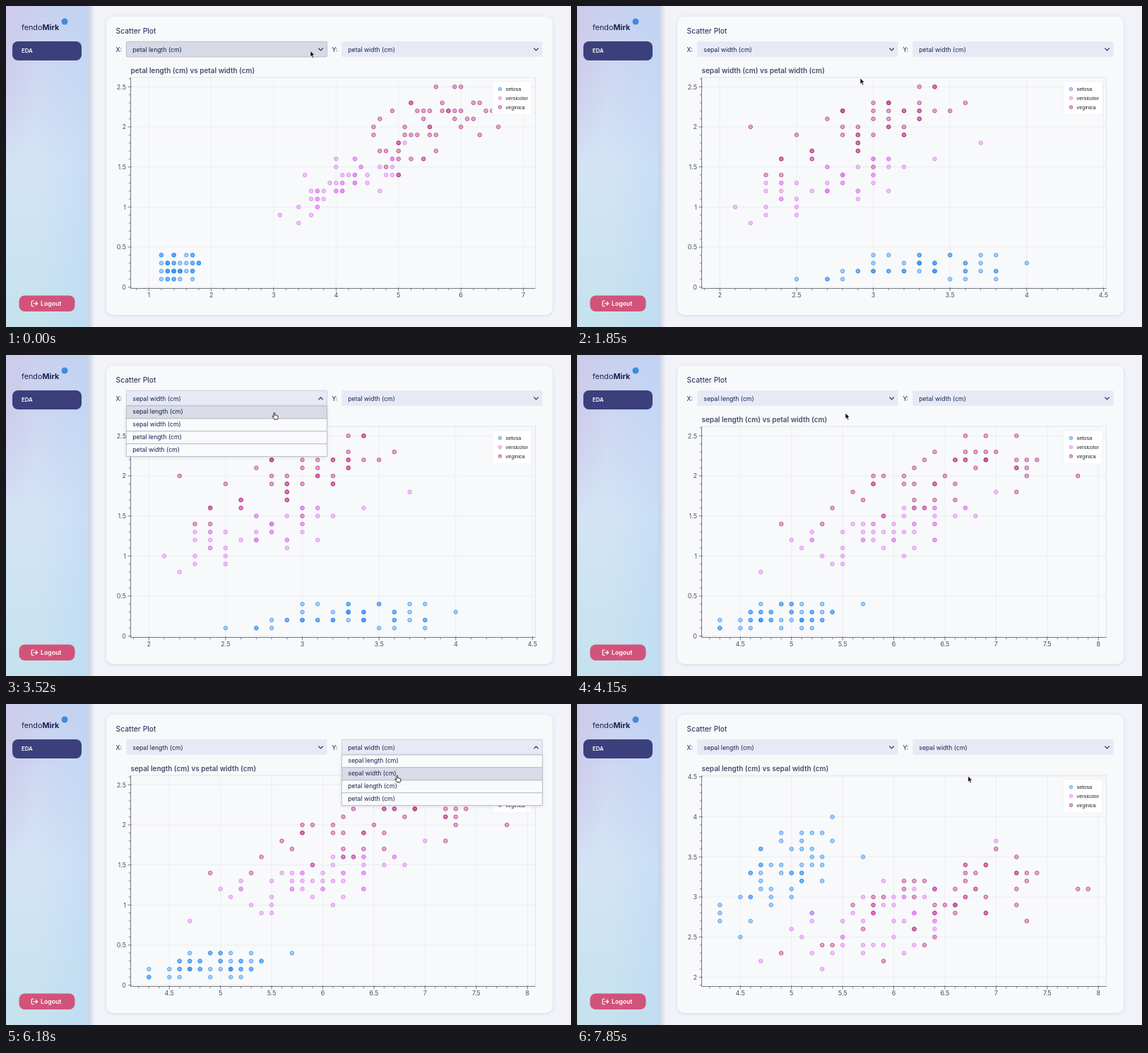
An HTML page that plays this animation: 800 px wide and 454 px high, repeating every 7.88 s.

```html
<!DOCTYPE html>
<html lang="en">
<head>
<meta charset="utf-8">
<title>Scatter Plot</title>
<style>
  html, body { margin: 0; width: 100%; height: 100%; overflow: hidden; background: #f1f3f9; }
  svg { display: block; width: 800px; height: 454px; font: 8.7px Inter, sans-serif; fill: #1c2050; }
  .legend { font: 7.4px "Liberation Sans", Arial, sans-serif; fill: #222; }
  .ticks { font-size: 9px; fill: #4c4f66; }
  .line { fill: none; stroke: #2c3058; stroke-width: 1.2; stroke-linecap: round; stroke-linejoin: round; }
</style>
</head>
<body>
<svg viewBox="0 0 800 454">
  <defs>
    <linearGradient id="side" x1="0" y1="0" x2="0" y2="1">
      <stop offset="0" stop-color="#c9d0ee"/>
      <stop offset=".5" stop-color="#d4e4f5"/>
      <stop offset="1" stop-color="#c5e2ed"/>
    </linearGradient>
    <linearGradient id="sheen">
      <stop offset=".4" stop-color="#b8d6f8" stop-opacity="0"/>
      <stop offset="1" stop-color="#b8d6f8" stop-opacity=".45"/>
    </linearGradient>
    <radialGradient id="lilac" cx="0" cy=".12" r=".4">
      <stop offset="0" stop-color="#d0c6e8" stop-opacity=".7"/>
      <stop offset="1" stop-color="#d0c6e8" stop-opacity="0"/>
    </radialGradient>
    <linearGradient id="shade">
      <stop offset="0" stop-color="#8f9cc0" stop-opacity=".4"/>
      <stop offset="1" stop-color="#8f9cc0" stop-opacity="0"/>
    </linearGradient>
    <filter id="soft" x="-10%" y="-10%" width="120%" height="125%">
      <feDropShadow dx="0" dy="1" stdDeviation="2" flood-color="#5a6490" flood-opacity=".2"/>
    </filter>
  </defs>

  <rect width="800" height="454" fill="#f1f3f9"/>
  <rect x="116" width="10" height="454" fill="url(#shade)"/>
  <rect width="116" height="454" fill="url(#side)"/>
  <rect width="116" height="454" fill="url(#lilac)"/>
  <rect width="116" height="454" fill="url(#sheen)"/>
  <circle cx="83" cy="22" r="4.5" fill="#3f8be0"/>
  <text x="22" y="34.3" font-size="10.8">fendo<tspan font-weight="700">Mirk</tspan></text>
  <rect x="9" y="50" width="98" height="27" rx="8" fill="#3b407c"/>
  <rect x="18.5" y="409.5" width="79" height="22.5" rx="8" fill="#d2537a"/>
  <rect x="142" y="15" width="632" height="422" rx="10" fill="#f8f9fb" filter="url(#soft)"/>
  <g fill="#fff" font-weight="600">
    <text x="22" y="66.3" font-size="7.8">EDA</text>
    <text x="49" y="424">Logout</text>
  </g>
  <path class="line" style="stroke:#fff" d="M39 417h-1.5q-1.3 0-1.3 1.3v5q0 1.3 1.3 1.3h1.5M39.3 420.8h5.2M42.3 418.4l2.4 2.4-2.4 2.4"/>
  <text x="155.5" y="38.8" font-size="10.4">Scatter Plot</text>
  <text x="155.5" y="64.6">X:</text>
  <text x="461.5" y="64.6">Y:</text>
  <g id="chart"></g>
  <g id="controls"></g>
  <path id="arrow" d="M0 0v8.4l1.9-1.7 1.4 3.2 1.5-.7-1.4-3.1h2.6z" fill="#000" stroke="#fff" stroke-width=".7"/>
  <path id="hand" d="M-.9 .6q0-1 .9-1t.9 1v2.7q1-.6 1.5.2 1-.5 1.5.4 1.3-.3 1.3.9v1.6q0 1.2-.8 2.6h-4.6q-.7-1.6-2.6-3.6-.4-1 .5-1.1l1.4 1z" fill="#fff" stroke="#111" stroke-width=".9" stroke-linejoin="round"/>
</svg>

<script>
const LOOP = 7880;
const $ = id => document.getElementById(id);

const FIELDS = [
  { name: 'sepal length (cm)', min: 4.3, max: 7.9, step: 0.5 },
  { name: 'sepal width (cm)', min: 2, max: 4.4, step: 0.5 },
  { name: 'petal length (cm)', min: 1, max: 6.9, step: 1 },
  { name: 'petal width (cm)', min: 0.1, max: 2.5, step: 0.5 }
];

// Mean and deviation per field; link says how closely sepals and petals follow the flower's size.
const SPECIES = [
  { name: 'setosa', fill: '#3c98f5', line: '#3a8fe8', link: [0.86, 0.35],
    mean: [5, 3.43, 1.46, 0.25], dev: [0.35, 0.38, 0.17, 0.1] },
  { name: 'versicolor', fill: '#e67df8', line: '#d67cea', link: [0.75, 0.9],
    mean: [5.94, 2.77, 4.26, 1.33], dev: [0.52, 0.31, 0.47, 0.2] },
  { name: 'virginica', fill: '#cf3f8d', line: '#a8307a', link: [0.72, 0.7],
    mean: [6.59, 2.97, 5.55, 2.03], dev: [0.64, 0.32, 0.55, 0.27] }
];

let seed = 7;
const random = () => (seed = (seed * 1664525 + 1013904223) % 4294967296) / 4294967296;
const bell = () => (random() + random() + random() - 1.5) * 2;

function flower({ mean, dev, link }) {
  const size = bell();
  return FIELDS.map(({ min, max }, k) => {
    const pull = link[k >> 1];
    const v = mean[k] + dev[k] * (pull * size + Math.sqrt(1 - pull * pull) * bell());
    return Math.min(max, Math.max(min, Math.round(v * 10) / 10));
  });
}
for (const s of SPECIES) s.flowers = Array.from({ length: 50 }, () => flower(s));

const LEFT = 176.5, RIGHT = 749.5, TOP = 101, BOTTOM = 399.5;

// Maps a field's range to pixels from a to b.
function scale({ min, max }, a, b) {
  return {
    px: v => a + (b - a) * (v - min) / (max - min),
    value: p => min + (max - min) * (p - a) / (b - a)
  };
}

function axisTicks(field, axis, from, to, draw) {
  const minor = field.step / 5;
  const last = Math.floor(axis.value(to) / minor);
  for (let n = Math.ceil(axis.value(from) / minor); n <= last; n++)
    draw(axis.px(n * minor), n % 5 === 0, +(n * minor).toFixed(1));
}

const dot = (x, y, s, r = 2.8) =>
  `<circle cx="${x}" cy="${y}" r="${r}" fill="${s.fill}" fill-opacity=".46" stroke="${s.line}" stroke-width=".8" stroke-opacity=".85"/>`;

function chart(fx, fy) {
  const X = FIELDS[fx], Y = FIELDS[fy];
  const ax = scale(X, 202.3, 723.7), ay = scale(Y, 386.3, 114.3);
  let grid = '', ticks = '', labels = '', dots = '', legend = '';
  axisTicks(X, ax, LEFT, RIGHT, (x, major, v) => {
    ticks += `M${x} ${BOTTOM - (major ? 1.3 : 0)}V${BOTTOM + (major ? 4 : 2.6)}`;
    if (!major) return;
    grid += `M${x} ${TOP}V${BOTTOM}`;
    labels += `<text x="${x}" y="412.3" text-anchor="middle">${v}</text>`;
  });
  axisTicks(Y, ay, BOTTOM, TOP, (y, major, v) => {
    ticks += `M${LEFT + (major ? 1.3 : 0)} ${y}H${LEFT - (major ? 4 : 2.6)}`;
    if (!major) return;
    grid += `M${LEFT} ${y}H${RIGHT}`;
    labels += `<text x="170" y="${y + 3.2}" text-anchor="end">${v}</text>`;
  });
  SPECIES.forEach((s, i) => {
    for (const f of s.flowers) dots += dot(ax.px(f[fx]), ay.px(f[fy]), s);
    const y = 117.5 + i * 12.8;
    legend += dot(699.5, y, s, 2.3) + `<text x="707.5" y="${y + 2.4}">${s.name}</text>`;
  });
  return `<text x="176.5" y="95.2" font-size="9.95" font-weight="600" fill="#4a4c69">${X.name} vs ${Y.name}</text>
    <path d="${grid}" stroke="#e9ebef" stroke-width=".8"/>
    <rect x="${LEFT}" y="${TOP}" width="${RIGHT - LEFT}" height="${BOTTOM - TOP}" fill="none" stroke="#dcdee4" stroke-width=".8"/>
    <path d="M${LEFT} ${TOP}V${BOTTOM}H${RIGHT}${ticks}" fill="none" stroke="#4b4d57" stroke-width=".7"/>
    <g class="ticks">${labels}</g>${dots}
    <rect x="688.5" y="106.5" width="55.5" height="47.5" fill="#fff" fill-opacity=".95" stroke="#eceef2" stroke-width=".7"/>
    <g class="legend">${legend}</g>`;
}

const BOX = [170.3, 475.3], WIDTH = 284.3, ITEM = 17.9, MENU_TOP = 72;

function select(i, field, open, hover) {
  const x = BOX[i], dark = hover && !open;
  const border = dark ? '#b4b8c8' : open ? '#c3c7d6' : 'none';
  const dy = open ? -2.8 : 2.8;
  return `<rect x="${x}" y="50.3" width="${WIDTH}" height="21.7" rx="1.5" fill="${dark ? '#d6dae5' : '#e6eaf5'}" stroke="${border}" stroke-width=".8"/>
    <text x="${x + 9}" y="64.6">${FIELDS[field].name}</text>
    <path class="line" d="M${x + 272.5} ${61.4 - dy / 2}l2.8 ${dy} 2.8 ${-dy}"/>`;
}

function menu(i, hover) {
  const x = BOX[i];
  const items = FIELDS.map(({ name }, k) => {
    const y = MENU_TOP + k * ITEM;
    return `<rect x="${x}" y="${y}" width="${WIDTH}" height="${ITEM}" fill="${k === hover ? '#d9dbe7' : '#f9fafc'}" stroke="#b1b3bd" stroke-width=".8"/>
      <text x="${x + 9}" y="${y + 11.2}">${name}</text>`;
  });
  return `<g filter="url(#soft)">${items.join('')}</g>`;
}

// The cursor glides to each stop, rests, then clicks; a click sets the given values.
const GLIDE = 300, REST = 220;
const STOPS = [
  { at: -REST, x: 431, y: 63.5, set: { fx: 2, fy: 3, open: -1 } },
  { at: 400, x: 425, y: 62, set: { open: 0 } },
  { at: 1000, x: 417, y: 82, set: {} },
  { at: 1600, x: 401, y: 102, set: { fx: 1, open: -1 } },
  { at: 3050, x: 384, y: 63, set: { open: 0 } },
  { at: 3500, x: 380, y: 82, set: { fx: 0, open: -1 } },
  { at: 4850, x: 560, y: 66.5, set: { open: 1 } },
  { at: 6200, x: 553.7, y: 102, set: { fy: 1, open: -1 } }
];

function sceneAt(t) {
  const scene = { x: STOPS[0].x, y: STOPS[0].y };
  for (const { at, x, y, set } of STOPS) {
    const u = Math.min(1, Math.max(0, (t - at) / GLIDE + 1));
    const ease = u * u * (3 - 2 * u);
    scene.x += (x - scene.x) * ease;
    scene.y += (y - scene.y) * ease;
    if (t >= at + REST) Object.assign(scene, set);
  }
  return scene;
}

// Rewrites a group only when its key changes.
const shown = {};
function update(id, key, markup) {
  if (shown[id] === key) return;
  shown[id] = key;
  $(id).innerHTML = markup();
}

function frame(now) {
  const { x, y, fx, fy, open } = sceneAt(now % LOOP);
  const over = BOX.findIndex(b => x >= b && x <= b + WIDTH && y >= 50 && y < MENU_TOP);
  const item = open < 0 || y < MENU_TOP ? -1 : Math.floor((y - MENU_TOP) / ITEM);

  update('chart', `${fx},${fy}`, () => chart(fx, fy));
  update('controls', [fx, fy, open, over, item].join(), () =>
    select(0, fx, open === 0, over === 0) + select(1, fy, open === 1, over === 1) +
    (open < 0 ? '' : menu(open, item)));

  for (const [id, visible] of [['arrow', item < 0], ['hand', item >= 0]]) {
    $(id).setAttribute('transform', `translate(${x} ${y})`);
    $(id).setAttribute('visibility', visible ? 'visible' : 'hidden');
  }
  requestAnimationFrame(frame);
}
requestAnimationFrame(frame);
</script>
</body>
</html>
```
